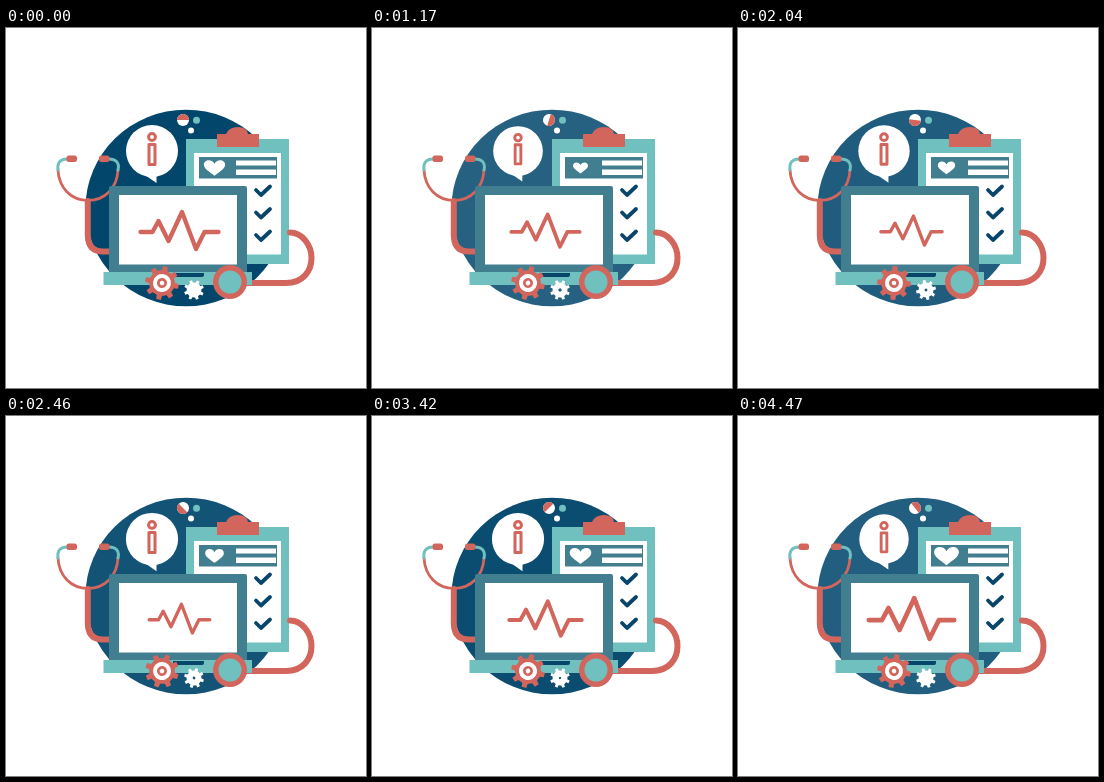
Animation, 360 px wide and 360 px high, one loop 4.5 s. Source, as an HTML page:

```html
<!DOCTYPE html>
<html lang="en">
<head>
<meta charset="utf-8">
<title>Online health check</title>
<style>
  html, body { margin: 0; width: 100%; height: 100%; overflow: hidden; background: #fff; }
  svg { display: block; width: 100%; height: 100%; }
  .red { fill: #d2655c; }
  .aqua { fill: #70c0bf; }
  .teal { fill: #417f90; }
  .navy { fill: #07456a; }
  .white { fill: #fff; }
  .line { fill: none; stroke: #d2655c; stroke-linecap: round; stroke-linejoin: round; }
</style>
</head>
<body>
<svg viewBox="0 0 360 360">
  <ellipse id="disc" cx="180" cy="180" rx="100.500" ry="98.300"/>

  <!-- pill and dots -->
  <g id="pill">
    <circle class="white" r="6"/>
    <path class="red" d="M-6 0A6 6 0 0 1 6 0Z"/>
  </g>
  <circle class="aqua" cx="190.5" cy="92.3" r="3.5"/>
  <circle class="white" cx="185" cy="102.5" r="3"/>

  <!-- speech bubble -->
  <g id="bubble">
    <circle class="white" r="26"/>
    <path class="white" d="M-10 22L4.500 32V22Z"/>
    <g class="line" stroke-width="3">
      <circle cy="-14" r="3.4"/>
      <path d="M-3-6.500H3V13.500H-3Z"/>
    </g>
  </g>

  <!-- clipboard -->
  <path class="aqua" d="M180 111H283V236H180Z"/>
  <path class="white" d="M188 125H275V226.500H188Z"/>
  <path class="red" d="M211 119V106H220Q223 99 232 99T242 106H253V119Z"/>
  <path class="teal" d="M193 129H271V150.500H193Z"/>
  <path class="white" d="M230 132.500h40v5h-40zM230 141.500h40v5.500h-40z"/>
  <path id="heart" class="white" d="M0 8C-5 4-10.600 1-10.600-3C-10.600-9-2-9 0-4C2-9 10.600-9 10.600-3C10.600 1 5 4 0 8Z"/>
  <path fill="none" stroke="#07456a" stroke-width="3.8" stroke-linecap="round" stroke-linejoin="round"
    d="M250 162l5 5 9-8.500M250 184.500l5 5 9-8.500M250 207l5 5 9-8.500"/>

  <!-- stethoscope tubes -->
  <path class="line" stroke-width="6" d="M81.800 173V207Q82 223.500 97 223.500H105M240 255H280C297 255 305.500 243 305.500 230S296 204.500 284 204.500"/>
  <path class="line" stroke-width="2.800" d="M52 142C53 160 65 172.300 82 172.300S111 160 112 142"/>
  <path class="line" style="stroke:#70c0bf" stroke-width="3" d="M52 142C51 134 55 131 61 131M112 142C114 134 109 131 103 131"/>
  <rect class="red" x="60.500" y="127.500" width="10.500" height="6.500" rx="2.500"/>
  <rect class="red" x="93" y="127.500" width="10.500" height="6.500" rx="2.500"/>

  <!-- laptop -->
  <path class="teal" d="M105 158H239Q241 158 241 160V244H103V160Q103 158 105 158Z"/>
  <path class="white" d="M113 167H231V236.500H113Z"/>
  <path class="aqua" d="M97.500 244H246V257H97.500Z"/>
  <path class="navy" d="M167 245H198V247Q198 249 196 249H169Q167 249 167 247Z"/>
  <path id="pulse" class="line" stroke-width="4.300" d="M-39 1H-27L-21-10L-11 10L2.500-19L16.500 18L25 1H39"/>

  <!-- chest piece -->
  <circle class="red" cx="224" cy="254" r="17"/>
  <circle class="aqua" cx="224" cy="254" r="11.500"/>

  <!-- gears -->
  <g id="bigGear">
    <path class="red"/>
    <circle class="white" r="9"/>
    <circle class="red" r="5"/>
    <circle class="white" r="2.300"/>
  </g>
  <g id="smallGear">
    <path class="white"/>
    <circle id="hole" class="navy"/>
  </g>
</svg>
<script>
const LOOP = 4500, STEP = 30;
const $ = id => document.getElementById(id);

// Linear interpolation through [seconds, value] keys.
function track(t, ...keys) {
  const i = Math.max(1, keys.findIndex(k => k[0] >= t));
  const [[t0, a], [t1, b]] = [keys[i - 1], keys[i]];
  return a + (b - a) * (t - t0) / (t1 - t0);
}

function gearPath(teeth, inner, outer) {
  const pitch = 2 * Math.PI / teeth, points = [];
  for (let i = 0; i < teeth; i++) {
    for (const [offset, r] of [[-.27, inner], [-.18, outer], [.18, outer], [.27, inner]]) {
      const a = (i + offset) * pitch;
      points.push((r * Math.sin(a)).toFixed(2) + " " + (-r * Math.cos(a)).toFixed(2));
    }
  }
  return "M" + points.join("L") + "Z";
}

function place(id, x, y, scale, angle = 0) {
  $(id).setAttribute("transform", `translate(${x} ${y}) rotate(${angle}) scale(${scale})`);
}

function draw(t) {
  const light = track(t, [0, 0], [1.5, 1], [3, 0], [4.5, .7]);
  const mix = (a, b) => Math.round(a + (b - a) * light);
  const navy = `rgb(${mix(2, 48)},${mix(70, 105)},${mix(107, 136)})`;
  $("disc").style.fill = navy;
  $("hole").style.fill = navy;
  $("hole").setAttribute("r", track(t, [0, 0], [.7, 1.8], [3.8, 1], [4.5, 0]));

  place("pill", 177, 92, 1, 92 * t);
  place("bubble", 146, 123, track(t, [0, 1], [.9, .945], [3, 1.025], [4.5, .95]));
  place("heart", 208.5, 139.8, track(t, [0, 1], [1.18, .7], [4.5, 1.17]));
  place("pulse", 173.5, 203, track(t, [0, 1], [2.32, .755], [4.5, 1.1]));
  place("bigGear", 156, 255, 1, 12 + 40 * t);
  place("smallGear", 188, 262, 1, 25 - 40 * t);
}

function tick(now) {
  draw(Math.floor(now % LOOP / STEP) * STEP / 1000);
  requestAnimationFrame(tick);
}

$("bigGear").firstElementChild.setAttribute("d", gearPath(8, 13, 17));
$("smallGear").firstElementChild.setAttribute("d", gearPath(8, 7.5, 10));
draw(0);
requestAnimationFrame(tick);
</script>
</body>
</html>
```
